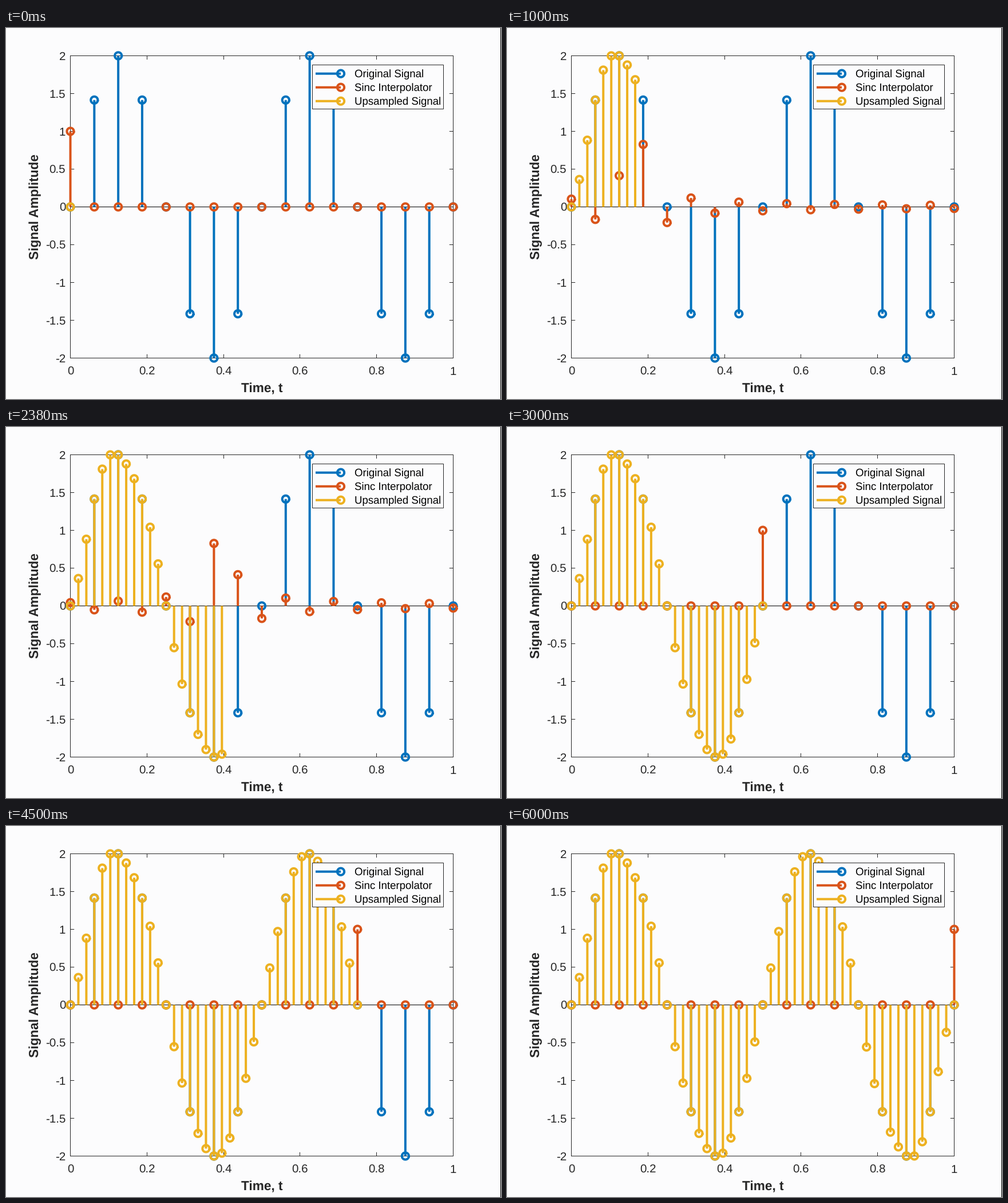
A matplotlib script for the animation above (6120 ms loop, 865 px wide and 648 px high).

```python
import numpy as np
import matplotlib.pyplot as plt
from matplotlib.animation import FuncAnimation
from matplotlib.collections import LineCollection
from matplotlib.patches import Rectangle

W, H, DPI = 865, 648, 100
PX = 72 / DPI  # points per pixel
BLUE, RED, YELLOW = "#0072BD", "#D95319", "#EDB120"
INK, PAPER = "#262626", "#FCFCFD"
LEFT, RIGHT, TOP, BOTTOM = 112.5, 781.5, 48.5, 576.5
STEPS, LOOP = 49, 6120

plt.rcParams["font.family"] = "Liberation Sans"
plt.rcParams["text.hinting"] = "none"

fig = plt.figure(figsize=(W / DPI, H / DPI), dpi=DPI, facecolor=PAPER)
ax = fig.add_axes([0, 0, 1, 1])
ax.set(xlim=(0, W), ylim=(H, 0))
ax.axis("off")

# The circle overlaps its own start so that no seam shows.
angle = np.linspace(0, 2.1 * np.pi, 48)
CIRCLE = 6.1 * np.column_stack([np.cos(angle), np.sin(angle)])


def to_x(t):
    return LEFT + (RIGHT - LEFT) * np.asarray(t)


def to_y(v):
    return (TOP + BOTTOM) / 2 - (BOTTOM - TOP) / 4 * np.asarray(v)


def line(xs, ys, color=INK, z=1):
    ax.plot(xs, ys, color=color, lw=PX, zorder=z, snap=False,
            solid_capstyle="butt")


def text(x, y, s, size, **kw):
    kw = {"color": INK, "va": "baseline", "zorder": 1, **kw}
    ax.text(x, y, s, fontsize=size * PX, **kw)


def strokes(color, z):
    group = LineCollection([], colors=color, linewidths=4 * PX, zorder=z,
                           capstyle="butt", snap=False)
    ax.add_collection(group, autolim=False)
    return group


def set_stems(group, t, v):
    tips = np.column_stack([to_x(t), to_y(v)])
    base = float(to_y(0))
    bars = [np.array([(x, base), (x, y)]) for x, y in tips]
    group.set_segments(bars + [tip + CIRCLE for tip in tips])


def draw_axes():
    line([LEFT, RIGHT, RIGHT, LEFT, LEFT], [TOP, TOP, BOTTOM, BOTTOM, TOP])
    tick = 6.7
    for t in np.arange(6) / 5:
        x = np.floor(to_x(t)) + 0.5
        line([x, x], [BOTTOM, BOTTOM - tick])
        line([x, x], [TOP, TOP + tick])
        text(x, 605.8, f"{t:g}", 20.5, ha="center")
    for v in np.arange(-4, 5) / 2:
        y = float(to_y(v))
        line([LEFT, LEFT + tick], [y, y])
        line([RIGHT, RIGHT - tick], [y, y])
        text(104.2, y + 7.4, f"{v:g}", 20.5, ha="right")
    line([LEFT, RIGHT], [to_y(0)] * 2, "black", 1.5)
    text(447.5, 636, "Time, t", 22.6, ha="center", weight="bold")
    text(57.2, 312.5, "Signal Amplitude", 22.6, ha="center", weight="bold",
         rotation=90, rotation_mode="anchor")


def draw_legend():
    ax.add_patch(Rectangle((535.5, 64.5), 229, 77, fc=PAPER, ec=INK,
                           lw=PX, zorder=6, snap=False))
    rows = [("Original Signal", BLUE), ("Sinc Interpolator", RED),
            ("Upsampled Signal", YELLOW)]
    for i, (label, color) in enumerate(rows):
        y = 79.7 + 24 * i
        strokes(color, 7).set_segments([np.array([(541, y), (585, y)]),
                                        CIRCLE + (585, y)])
        text(608.8, y + 6.6, label, 18.6, color="black", zorder=7)


n = np.arange(17)
samples = 2 * np.sin(4 * np.pi * n / 16)
fine = np.arange(STEPS) / (STEPS - 1)
kernels = np.sinc(16 * fine[:, None] - n)
upsampled = kernels @ samples

draw_axes()
draw_legend()
line([W - 0.5] * 2, [0, H], "black")
signal, kernel, output = strokes(BLUE, 2), strokes(RED, 3), strokes(YELLOW, 4)
set_stems(signal, n / 16, samples)


def update(k):
    set_stems(kernel, n / 16, kernels[k])
    set_stems(output, fine[:k + 1], upsampled[:k + 1])
    return []


anim = FuncAnimation(fig, update, frames=STEPS, interval=LOOP / STEPS,
                     init_func=lambda: update(0), repeat=True, repeat_delay=0)
plt.show()
```
